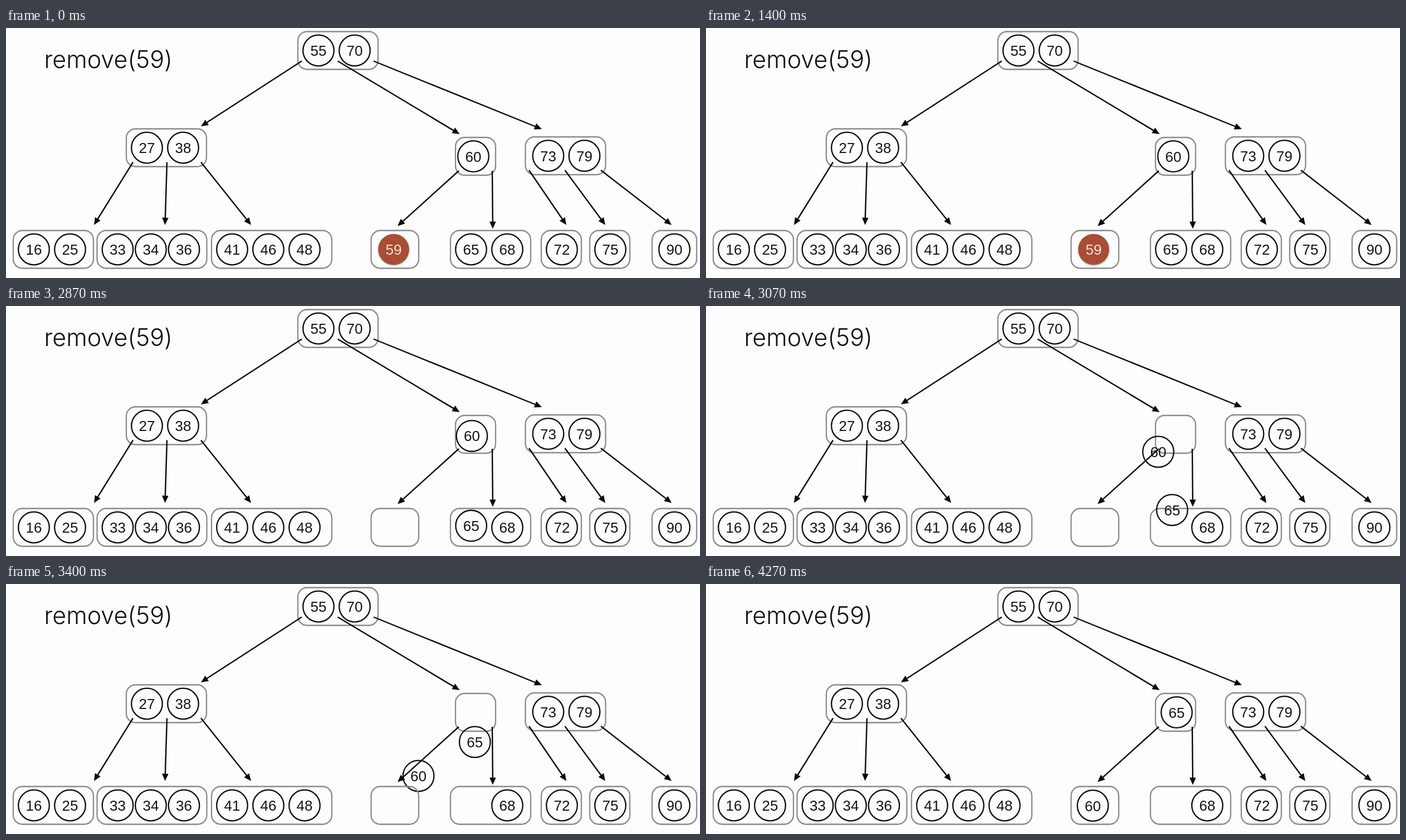
These frames come from a looping animation (1246x450 px, 4990 ms). An HTML page:

```html
<!DOCTYPE html>
<html lang="en">
<head>
<meta charset="utf-8">
<title>Tree removal</title>
<style>
  html, body { margin: 0; width: 100%; height: 100%; overflow: hidden; background: #fdfdfd; }
  svg { display: block; width: 100%; height: 100%; }
  .box { fill: none; stroke: #8b8b8b; stroke-width: 2.3; }
  .line { stroke: #080808; stroke-width: 2.4; }
  .head { fill: #080808; }
  .key circle { fill: none; stroke: #0c0c0c; stroke-width: 2.3; }
  .key text { font: 26px "Liberation Sans", Arial, sans-serif; text-anchor: middle; fill: #151515; }
  .removed circle { fill: #a94d33; stroke: none; filter: drop-shadow(0 1.5px 1.2px rgba(0, 0, 0, .4)); }
  .removed text { fill: #f6e4dd; }
  .title { font: 300 43px Inter, Roboto, sans-serif; fill: #101010; }
</style>
</head>
<body>
<svg id="stage" viewBox="0 0 1246 450">
  <text class="title" x="68.5" y="72">remove(59)</text>
</svg>
<script>
const LOOP = 4990;
const FPS = 15;
const LEAF_TOP = 364.5;
const BOX_HEIGHT = 68;
const SLOT = 72;
const RADIUS = 27.8;

const stage = document.getElementById('stage');
const keys = {};

function add(parent, tag, attrs, text = '') {
  const el = document.createElementNS('http://www.w3.org/2000/svg', tag);
  for (const name in attrs) el.setAttribute(name, attrs[name]);
  el.textContent = text;
  return parent.appendChild(el);
}

function place(el, x, y) {
  el.setAttribute('transform', `translate(${x} ${y})`);
}

function drawKey(value, x, y) {
  const el = add(stage, 'g', { class: 'key' });
  add(el, 'circle', { r: RADIUS });
  add(el, 'text', { y: 9.5 }, value);
  place(el, x, y);
  keys[value] = { el, x, y };
}

function drawArrow(x1, y1, x2, y2) {
  const angle = Math.atan2(y2 - y1, x2 - x1) * 180 / Math.PI;
  const length = Math.hypot(x2 - x1, y2 - y1);
  const g = add(stage, 'g', { transform: `translate(${x2} ${y2}) rotate(${angle})` });
  add(g, 'path', { class: 'line', d: `M${-length} 0H-10` });
  add(g, 'path', { class: 'head', d: 'M0 0L-13 -5.8V5.8Z' });
}

// x is the centre of the first key; ports are spread evenly below the parent.
function drawNode({ values, x, top = LEAF_TOP, pitch = 65, left = x - 37,
                    width = SLOT * values.length, port, spread, children = [] }) {
  add(stage, 'rect', { class: 'box', x: left, y: top, width, height: BOX_HEIGHT, rx: 16.5 });
  values.forEach((value, i) => drawKey(value, x + i * pitch, top + BOX_HEIGHT / 2));
  children.forEach((child, i) => {
    drawNode(child);
    const tipY = (child.top ?? LEAF_TOP) - (child.gap ?? 10);
    drawArrow(port + i * spread, top + (child.top ? 53 : 59) + (child.top ? 0 : 1), child.tip, tipY);
  });
}

const leaf = (values, x, tip, shape) => ({ values, x, tip, ...shape });

drawNode({
  values: [55, 70], x: 561, top: 6.5, port: 531, spread: 64.5,
  children: [
    {
      values: [27, 38], x: 253, top: 181.5, tip: 350, gap: 4.5, port: 228, spread: 61,
      children: [
        leaf([16, 25], 50, 158),
        leaf([33, 34, 36], 200.5, 285.5, { pitch: 59.5, width: 197 }),
        leaf([41, 46, 48], 406, 440)
      ]
    },
    {
      values: [60], x: 839, top: 197, left: 807, tip: 814.5, gap: 6, port: 813, spread: 60,
      children: [
        leaf([59], 696, 703, { left: 655.5, width: 85.5, gap: 8 }),
        leaf([65, 68], 835, 874, { gap: 3 })
      ]
    },
    {
      values: [73, 79], x: 973.5, top: 196, left: 932.5, tip: 962, gap: 14, port: 939, spread: 64.5,
      children: [
        leaf([72], 998, 1006),
        leaf([75], 1085, 1076),
        leaf([90], 1200, 1195, { left: 1160, width: 80 })
      ]
    }
  ]
});

keys[59].el.classList.add('removed');

const clamp = v => Math.min(1, Math.max(0, v));
const progress = (time, begin, duration) => clamp((time - begin) / duration);
const ease = u => (1 - Math.cos(Math.PI * u)) / 2;

function move(key, x, y, p) {
  place(key.el, key.x + (x - key.x) * p, key.y + (y - key.y) * p);
}

function render(time) {
  const frame = Math.floor(time * FPS / 1000 + 0.06);
  const now = frame * 1000 / FPS;
  keys[59].el.setAttribute('opacity', 1 - progress(now, 1600, 266));
  const p = ease(progress(now, 2782, 1000));
  move(keys[60], 694.5, 399, p);
  move(keys[65], 845, 231, p);
}

const start = performance.now();
function tick() {
  render((performance.now() - start) % LOOP);
  requestAnimationFrame(tick);
}
tick();
</script>
</body>
</html>
```
